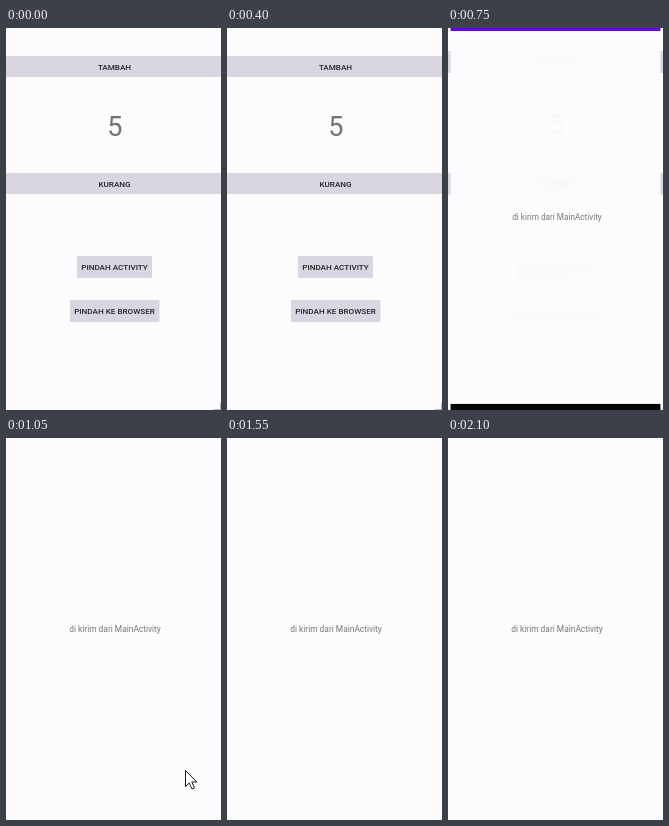
Animation, 215 px wide and 382 px high, one loop 2200 ms. Source, as an HTML page:

```html
<!DOCTYPE html>
<html lang="id">
<head>
<meta charset="utf-8">
<title>Pindah Activity</title>
<style>
  html, body { margin: 0; width: 100%; height: 100%; overflow: hidden; background: #fcfbfe; }
  svg { display: block; width: 100vw; height: 100vh; }
  text { font-family: Roboto, sans-serif; text-anchor: middle; }
  .label { font-size: 8.1px; font-weight: 500; fill: #242426; }
  .count { font-size: 27px; fill: #737375; }
  .message { font-size: 8.4px; fill: #78787a; }
  .button { fill: #d7d6e1; }
  .page { fill: #fcfbfe; }
</style>
</head>
<body>
<svg viewBox="0 0 215 382">
  <defs>
    <clipPath id="pressClip"><rect x="71" y="228" width="75" height="22" rx="1"/></clipPath>
  </defs>
  <g id="home">
    <rect class="page" width="215" height="382"/>
    <rect class="button" y="28" width="215" height="21" rx="1"/>
    <rect class="button" y="145" width="215" height="21" rx="1"/>
    <rect class="button" x="71" y="228" width="75" height="22" rx="1"/>
    <rect class="button" x="64" y="272" width="89.500" height="22" rx="1"/>
    <circle id="ripple" cx="92" cy="239" fill="#c6c9cb" clip-path="url(#pressClip)"/>
    <text class="label" x="108.500" y="41.500">TAMBAH</text>
    <text class="count" x="108.800" y="107.500">5</text>
    <text class="label" x="108.500" y="158.500">KURANG</text>
    <text class="label" x="108.500" y="242">PINDAH ACTIVITY</text>
    <text class="label" x="108.500" y="285.800">PINDAH KE BROWSER</text>
    <path d="M208 381.500H214.500V375" fill="none" stroke="#a5a5a8" stroke-width=".8"/>
  </g>
  <g id="detail">
    <rect class="page" width="215" height="382"/>
    <rect y="-14" width="215" height="14" fill="#6200ee"/>
    <rect y="382" width="215" height="25"/>
    <text class="message" x="109" y="193.700">di kirim dari MainActivity</text>
  </g>
  <path id="cursor" d="M179.500 332.500V348.500L183.200 345L186 351L188.500 350L185.800 344H190.800Z"
        fill="#fff" stroke="#000" stroke-width=".9"/>
</svg>
<script>
const LOOP = 2200, STEP = 50;
const PRESS = 450, OPEN = 550, SETTLE = 900;
const [home, detail, ripple, cursor] =
  ["home", "detail", "ripple", "cursor"].map(id => document.getElementById(id));

const ramp = (t, from, to) => Math.min(1, Math.max(0, (t - from) / (to - from)));
const easeOut = p => 1 - (1 - p) ** 2;
const show = (el, on) => el.setAttribute("visibility", on ? "visible" : "hidden");
const zoom = (el, s, x, y) =>
  el.setAttribute("transform", `translate(${x} ${y}) scale(${s}) translate(${-x} ${-y})`);

function draw(now) {
  const t = Math.floor(now % LOOP / STEP) * STEP;
  const p = easeOut(ramp(t, OPEN, SETTLE));

  ripple.setAttribute("r", 24 * ramp(t, PRESS, OPEN));
  zoom(home, 1 + 0.05 * p, 107.5, 150);
  zoom(detail, 0.87 + 0.13 * p, 107.5, 127);
  detail.setAttribute("opacity", ramp(t, OPEN, 755));
  show(home, t < SETTLE);
  show(detail, t > OPEN);
  show(cursor, t >= 1050 && t < 1150);
}

function tick() {
  draw(performance.now());
  requestAnimationFrame(tick);
}
tick();
</script>
</body>
</html>
```
